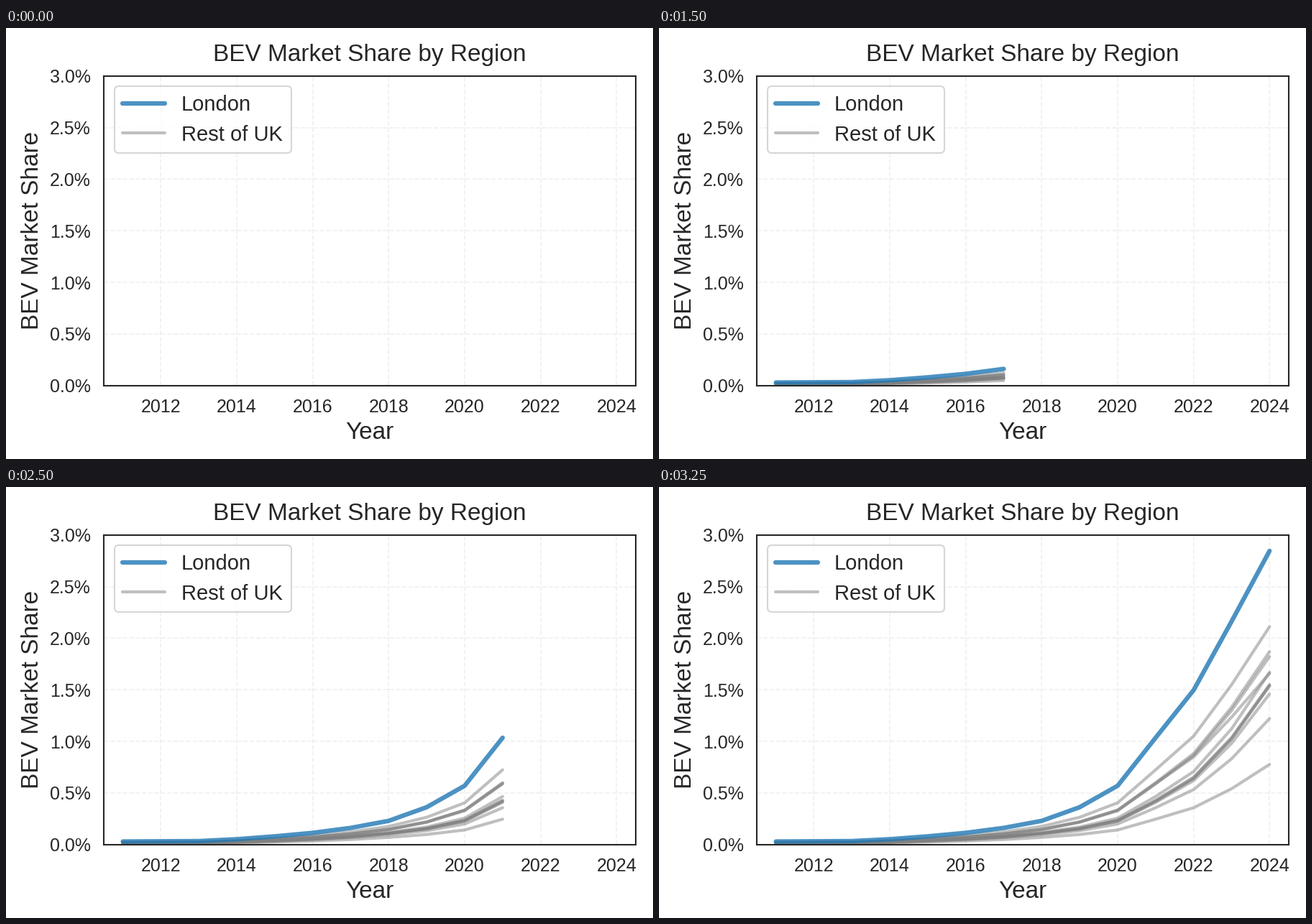
A matplotlib script for the animation above (3500 ms loop, 900 by 600 pixels).

```python
import matplotlib.pyplot as plt
import numpy as np
from matplotlib.animation import FuncAnimation
from matplotlib.ticker import MultipleLocator, PercentFormatter

WIDTH, HEIGHT, DPI = 900, 600, 150
LEFT, RIGHT, TOP, BOTTOM = 136.15, 875.7, 66.7, 497.8
INK = "#262626"

plt.rcParams.update({
    "font.family": "Liberation Sans",
    "text.color": INK,
    "axes.labelcolor": INK,
    "axes.edgecolor": INK,
    "axes.linewidth": 1.0,
    "axes.axisbelow": True,
    "xtick.color": INK,
    "ytick.color": INK,
    "patch.linewidth": 1.0,
    "lines.solid_capstyle": "round",
})

years = np.arange(2011, 2025)

# London's share in percent grows geometrically between these years
milestones = {2011: 0.03, 2013: 0.034, 2015: 0.08, 2018: 0.23,
              2020: 0.57, 2021: 1.035, 2023: 2.162, 2024: 2.845}
london = np.exp(np.interp(years, list(milestones),
                          np.log(list(milestones.values()))))

# Each region's share relative to London: in 2021 and in 2024
relative_levels = [
    (0.700, 0.742), (0.580, 0.657), (0.568, 0.640), (0.572, 0.583),
    (0.450, 0.587), (0.415, 0.545), (0.409, 0.541), (0.404, 0.541),
    (0.395, 0.513), (0.345, 0.429), (0.238, 0.273),
]


def region_share(dip, end):
    """Follow London at a steady ratio, then along a parabola from 2018."""
    start = dip + 0.065
    curve = np.polyfit([0, 1, 2], [start, dip, end], 2)
    t = np.clip((years - 2018) / 3, 0, None)
    return london * np.polyval(curve, t)


fig = plt.figure(figsize=(WIDTH / DPI, HEIGHT / DPI), dpi=DPI, facecolor="white")
ax = fig.add_axes([LEFT / WIDTH, 1 - BOTTOM / HEIGHT,
                   (RIGHT - LEFT) / WIDTH, (BOTTOM - TOP) / HEIGHT])

ax.set_xlim(2010.5, 2024.5)
ax.set_ylim(0, 3)
ax.xaxis.set_major_locator(MultipleLocator(2))
ax.yaxis.set_major_locator(MultipleLocator(0.5))
ax.yaxis.set_major_formatter(PercentFormatter(decimals=1))
ax.tick_params(length=0, pad=8.8, labelsize=12)
ax.grid(True, linestyle="--", color="0.8", linewidth=0.8, alpha=0.3)
ax.set_title("BEV Market Share by Region", fontsize=16, pad=10)
ax.set_xlabel("Year", fontsize=16, labelpad=4)
ax.set_ylabel("BEV Market Share", fontsize=16, labelpad=4.3)


def add_line(color, width, alpha, zorder, label=None):
    return ax.plot([], [], color=color, linewidth=width, alpha=alpha,
                   zorder=zorder, label=label)[0]


series = [(add_line("#1f77b4", 3, 0.8, 2.2, "London"), london)]
for i, levels in enumerate(relative_levels):
    label = "Rest of UK" if i == 0 else None
    series.append((add_line("gray", 2, 0.5, 2, label), region_share(*levels)))

ax.legend(loc="upper left", fontsize=14, labelspacing=0.465,
          framealpha=0.8, edgecolor="0.8")


def update(frame):
    for line, values in series:
        line.set_data(years[:frame + 1], values[:frame + 1])
    return [line for line, _ in series]


anim = FuncAnimation(fig, update, frames=len(years), interval=250,
                     repeat=True, repeat_delay=0)
plt.show()
```
